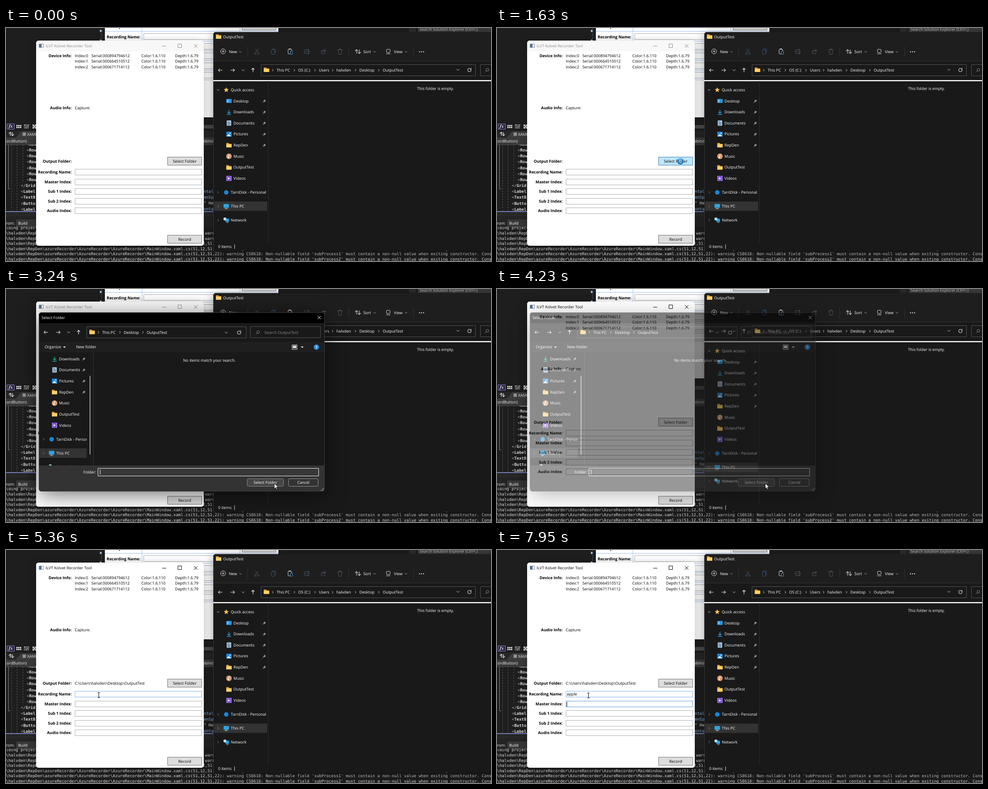
Recreate the animation shown at these times as an HTML page with a canvas. Size 1079 by 519 pixels, loop 8 s.

```html
<!DOCTYPE html>
<html lang="en">
<head>
<meta charset="utf-8">
<title>Recorder tool</title>
<style>
html, body { margin: 0; width: 100%; height: 100%; overflow: hidden; background: #1e1e1e; }
canvas { display: block; }
</style>
</head>
<body>
<canvas id="stage" width="1079" height="519"></canvas>
<script>
const W = 1079, H = 519, LOOP = 8000;
const UI = '"Open Sans", "Noto Sans", sans-serif';
const MONO = '"DejaVu Sans Mono", "Noto Sans Mono", monospace';
const stage = document.getElementById('stage').getContext('2d');
let g = stage;

// ---------- drawing helpers ----------
function text(s, x, y, color = '#fff', o = {}) {
  g.font = `${o.weight || 'normal'} ${o.size || 8.75}px ${o.font || UI}`;
  g.textRendering = 'geometricPrecision';
  g.textAlign = o.align || 'left';
  g.fillStyle = color;
  g.fillText(s, x, y + 3);
}
const mono = (s, x, y, color, weight) => text(s, x, y, color, { font: MONO, size: 8.97, weight });
const label = (s, x, y) => text(s, x, y, '#000', { weight: 'bold', size: 8.8, align: 'right' });

function box(x, y, w, h, fill, stroke, r = 0) {
  g.beginPath();
  if (stroke) g.roundRect(x + .5, y + .5, w - 1, h - 1, r);
  else g.roundRect(x, y, w, h, r);
  if (fill) { g.fillStyle = fill; g.fill(); }
  if (stroke) { g.strokeStyle = stroke; g.lineWidth = 1; g.stroke(); }
}
function trace(pts) {
  g.beginPath();
  for (let i = 0; i < pts.length; i += 2) g.lineTo(pts[i], pts[i + 1]);
}
function line(color, width, ...pts) {
  trace(pts);
  g.strokeStyle = color;
  g.lineWidth = width;
  g.stroke();
}
function poly(fill, ...pts) {
  trace(pts);
  g.closePath();
  g.fillStyle = fill;
  g.fill();
}
function disc(x, y, r, fill, stroke, width = 1) {
  g.beginPath();
  g.arc(x, y, r, 0, 7);
  if (fill) { g.fillStyle = fill; g.fill(); }
  if (stroke) { g.strokeStyle = stroke; g.lineWidth = width; g.stroke(); }
}
function shadowed(blur, alpha, draw) {
  g.save();
  g.shadowColor = `rgba(0,0,0,${alpha})`;
  g.shadowBlur = blur;
  g.shadowOffsetY = blur / 6;
  draw();
  g.restore();
}
function clipped(x, y, w, h, draw) {
  g.save();
  g.beginPath();
  g.rect(x, y, w, h);
  g.clip();
  draw();
  g.restore();
}
const right = (x, y, c = '#ddd', s = 2.5) => line(c, 1, x - s / 2, y - s, x + s / 2, y, x - s / 2, y + s);
const down = (x, y, c = '#ddd', s = 2.5) => line(c, 1, x - s, y - s / 2, x, y + s / 2, x + s, y - s / 2);
function arrow(x, y, dx, dy, c, s = 4.5) {
  const hx = x + dx * s, hy = y + dy * s, k = 3.4;
  line(c, 1.1, x - dx * s, y - dy * s, hx, hy);
  line(c, 1.1, hx - (dx + dy) * k, hy - (dy + dx) * k, hx, hy, hx - (dx - dy) * k, hy - (dy - dx) * k);
}
function cross(x, y, s, c) {
  line(c, 1, x - s, y - s, x + s, y + s);
  line(c, 1, x + s, y - s, x - s, y + s);
}

// ---------- icons, centred on x, y ----------
const icon = {
  folder(x, y) {
    poly('#e5a02f', x - 6, y - 5, x - 1, y - 5, x + 1, y - 3, x + 6, y - 3, x + 6, y + 5, x - 6, y + 5);
    box(x - 6, y - 2, 12, 7, '#ffd166', null, 1);
  },
  star(x, y) {
    const pts = [];
    for (let i = 0; i < 10; i++) {
      const a = i * Math.PI / 5 - Math.PI / 2, r = i % 2 ? 2.7 : 6;
      pts.push(x + r * Math.cos(a), y + r * Math.sin(a));
    }
    poly('#fbc14a', ...pts);
  },
  desktop(x, y) {
    box(x - 6, y - 4.5, 12, 9, '#2795dc', null, 1);
    box(x - 4, y - 2.5, 3, 1.5, '#c5ecff');
    box(x - 4, y + .5, 3, 1.5, '#c5ecff');
  },
  download(x, y, c = '#2e9fdc') {
    line(c, 1.4, x, y - 5, x, y + 3);
    line(c, 1.4, x - 3.5, y - .5, x, y + 3, x + 3.5, y - .5);
    line(c, 1.4, x - 5, y + 5.3, x + 5, y + 5.3);
  },
  document(x, y) {
    box(x - 5, y - 6, 10, 12, '#a9c3dd', null, 1);
    for (let i = 0; i < 4; i++) box(x - 3, y - 4 + i * 2.3, i ? 6 : 3, 1.1, '#45688f');
  },
  picture(x, y) {
    box(x - 6, y - 5.5, 12, 11, '#1f86d8', null, 1);
    poly('#fff', x - 5, y + 4.5, x - .5, y - .5, x + 5, y + 4.5);
    disc(x + 2.5, y - 2.3, 1.2, '#fff');
  },
  music(x, y) {
    disc(x, y, 6.2, '#d99a6c');
    line('#fff', 1, x - .5, y + 2.5, x - .5, y - 3.2, x + 2.5, y - 2);
    disc(x - 1.6, y + 2.4, 1.5, '#fff');
  },
  video(x, y) {
    box(x - 6, y - 6, 12, 12, '#7a4fd0', null, 1);
    for (const dx of [-5, 3.8]) for (let i = 0; i < 3; i++) box(x + dx, y - 4.2 + i * 3.4, 1.3, 1.6, '#d9c9ff');
    poly('#fff', x - 1.8, y - 2.6, x + 2.5, y, x - 1.8, y + 2.6);
  },
  cloud(x, y) { disc(x, y, 5, '#1686d9'); },
  pc(x, y) {
    box(x - 6, y - 5, 12, 8.5, '#2fa3dd', null, 1);
    box(x - 1, y + 3.5, 2, 2, '#8fb8d0');
    box(x - 3.5, y + 5, 7, 1, '#a9c8da');
  },
  network(x, y) {
    box(x - 2, y - 3, 8, 7, '#2fa3dd', null, 1);
    disc(x - 3, y - 2.5, 3.4, '#8fcbea');
    line('#fff', .8, x - 6, y - 2.5, x, y - 2.5);
    line('#fff', .8, x - 3, y - 5.5, x - 3, y + .5);
    box(x, y + 5, 5, 1, '#a9c8da');
  },
  pin(x, y) {
    poly('#9a9a9a', x, y - 3.5, x + 3.5, y, x + 1.5, y + .5, x, y + 3, x - 3, y, x - .5, y - 1.5);
    line('#9a9a9a', 1, x - 1, y + 1, x - 4, y + 4);
  },
  refresh(x, y) {
    g.beginPath();
    g.arc(x, y, 3.8, -.4, 5.2);
    g.strokeStyle = '#ddd';
    g.lineWidth = 1.1;
    g.stroke();
    line('#ddd', 1.1, x + 3.6, y - 4.6, x + 3.6, y - 1.8, x + .8, y - 1.8);
  },
  search(x, y) {
    disc(x + 1, y - 1, 3, null, '#888');
    line('#888', 1, x - 1.2, y + 1.2, x - 4.5, y + 4.5);
  }
};
const PLACES = [['Desktop', 'desktop'], ['Downloads', 'download'], ['Documents', 'document'],
  ['Pictures', 'picture'], ['RepDen', 'folder'], ['Music', 'music'],
  ['OutputTest', 'folder'], ['Videos', 'video']];
const ROOTS = [['TarnDisk - Personal', 'cloud'], ['This PC', 'pc'], ['Network', 'network']];
const STEP = 24.65, ROOT_STEP = 30.8;

function places(x, y, pinX, tint) {
  PLACES.forEach(([name, kind], i) => {
    const ry = y + i * STEP;
    icon[kind](x, ry, tint);
    text(name, x + 10, ry);
    if (i < 5) icon.pin(pinX, ry);
  });
}
function roots(x, y, w) {
  box(x - 27, y + ROOT_STEP - 10.5, w, 21, '#333');
  clipped(x - 27, 0, w, H, () => ROOTS.forEach(([name, kind], i) => {
    const ry = y + i * ROOT_STEP;
    right(x - 18, ry, '#888');
    icon[kind](x, ry);
    text(name, x + 10.3, ry);
  }));
}
function navBar(x, y, boxW, crumbs) {
  arrow(x, y, -1, 0, '#ddd');
  arrow(x + 27, y, 1, 0, '#ddd');
  down(x + 50.5, y, '#ddd', 3);
  arrow(x + 72.5, y, 0, -1, '#fff');
  box(x + 90, y - 13, boxW, 26, '#191919', '#555');
  icon.folder(x + 102.5, y - 1);
  for (const [name, cx] of crumbs) {
    right(cx - 8.5, y);
    text(name, cx, y);
  }
}

// ---------- desktop behind the windows ----------
function designer() {
  line('#3b4c6b', 1, 212.5, 0, 212.5, 28);
  for (const y of [6.5, 28]) poly('#b9cdec', 209, y - 3, 214, y, 209, y + 3);
  box(220, 0, 386, 199, '#fff');
  for (let i = 0; i < 6; i++) line('#9cc3f0', 1, 220, 7.5 + i * 21.6, 606, 7.5 + i * 21.6);
  for (const x of [302.5, 520.5]) line('#9cc3f0', 1, x, 0, x, x < 400 ? 199 : 8);
  label('Output Folder:', 299, -3);
  label('Recording Name:', 299, 20);
  box(525, -14, 76, 19, '#ddd', '#707070');
  for (let i = 0; i < 5; i++) box(306, Math.round(12 + i * 21.6), 295, 14, '#fff', '#abadb3');
}
function editor() {
  box(440, 216, 21, 8, '#4b4b4b');
  box(2, 213, 17, 13, '#26233a', '#8f86d8');
  text('fx', 10.5, 219, '#eee', { weight: 'italic bold', align: 'center', font: '"Noto Serif", serif' });
  for (let i = 0; i < 6; i++) box(23 + i % 3 * 4, 216 + (i > 2) * 4, 3, 3, '#ddd');
  for (let i = 0; i < 12; i++) box(40 + i % 4 * 3, 215 + (i >> 2) * 3.2, i % 3 ? 1.5 : 2.4, 2, '#ccc');
  for (let i = 0; i < 9; i++) box(59 + i % 3 * 3, 215 + Math.floor(i / 3) * 3, 3, 3, i % 2 ? '#777' : '#ddd');
  box(0, 229, W, 15, '#262626');
  poly('#3d3d3d', 22, 244, 34, 230, 90, 230, 90, 244);
  arrow(9.5, 236, 0, -1, '#eee', 4);
  arrow(14.5, 236, 0, 1, '#eee', 4);
  box(37, 233, 7, 7, null, '#ccc');
  box(39, 235, 3, 3, '#ccc');
  text('XAML', 47, 237, '#eee');
  box(0, 244, W, 17, '#3a3a3a');
  text('recordButton)', 46, 252, '#eee', { align: 'right' });
  text('TabInd', 462, 252, '#eee', { align: 'right' });

  clipped(0, 260, W, 148, () => {
    line('#888', 1, 5.5, 260, 5.5, 358.5, 9, 358.5);
    g.setLineDash([3, 3]);
    for (const x of [12.5, 24.5, 37.5]) line('#5a5a5a', 1, x, 260, x, x > 30 ? 345 : 408);
    g.setLineDash([]);
    const tags = [...Array(7).fill('<RowD'), '</Grid', '<Label', '<TextB', '<Butto', '<Label'];
    tags.forEach((tag, i) => {
      const x = i < 7 ? 46 : 33, y = 259 + i * 13.15, n = tag[1] === '/' ? 2 : 1;
      mono(tag.slice(0, n), x, y, '#b4b4b4');
      mono(tag.slice(n), x + n * 5.4, y, '#dadada', 'bold');
    });
    ['ntal', 'mnSp', '" He', 'onta'].forEach((s, i) => mono(s, 440, 364 + i * 13.15, i === 2 ? '#ddd' : '#86b6ea'));
  });
  box(0, 408, W, 2, '#7a82c0');
}
function output() {
  box(0, 410, W, 35, '#242424');
  g.setLineDash([1, 3]);
  line('#555', 1, 0, 414.5, W, 414.5);
  line('#555', 1, 2, 417.5, W, 417.5);
  g.setLineDash([]);
  text('rom:', 0, 435, '#eee');
  box(23, 427, 60, 16, '#363636', '#444');
  text('Build', 27, 435);
  clipped(0, 443, W, 76, () => {
    box(0, 443, W, 76, '#1e1e1e');
    const root = '\\halvden\\RepDen\\azureRecorder\\AzureRecorder\\AzureRecorder\\';
    const warn = n => root + `MainWindow.xaml.cs(51,12,51,22): warning CS8618: Non-nullable field 'subProcess${n}' must contain a non-null value when exiting constructor. Consider`;
    const short = root + 'Cameras.cs(11,9,11,30): warning';
    ['ilding project', short, short, warn(1), warn(2), warn(1), warn(2)].forEach((s, i) =>
      mono(s, i ? 0 : -5.4, 445.3 + i * 11.6, '#dcdcdc'));
  });
}

function explorer() {
  shadowed(24, .4, () => box(461, 9, 640, 487, '#191919', null, 6));
  box(461, 9, 640, 64, '#1e1e1e', null, [6, 0, 0, 0]);
  line('#333', 1, 461, 73.5, W, 73.5);
  line('#3a3a3a', 1, 461.5, 14, 461.5, 496);
  icon.folder(473, 19);
  text('OutputTest', 483, 20);

  disc(483, 52, 5.5, null, '#ddd');
  line('#ddd', 1, 480, 52, 486, 52);
  line('#ddd', 1, 483, 49, 483, 55);
  text('New', 496, 53);
  text('Sort', 795, 53);
  text('View', 863, 53);
  for (const x of [521.5, 820, 890]) down(x, 53, '#aaa');
  for (const x of [537.5, 762.5, 906.5]) line('#333', 1, x, 41, x, 64);
  const dim = '#555', blue = '#36577a';
  line(dim, 1, 554.5, 46.5, 561, 55);
  line(dim, 1, 561.5, 46.5, 555, 55);
  disc(554.5, 57, 1.8, null, blue);
  disc(561.5, 57, 1.8, null, blue);
  box(592, 46, 8, 10, null, blue, 1);
  box(590, 48, 8, 11, '#1e1e1e', blue, 1);
  box(627, 47, 9, 11, null, '#ddd', 1);
  box(629, 46, 5, 2, '#ddd');
  box(632, 51, 6, 8, '#1e1e1e', '#4ca3e0', 1);
  box(663, 48, 12, 9, null, dim, 1);
  line(blue, 1, 672.5, 46, 672.5, 59);
  line(blue, 1, 665, 52.5, 670, 52.5);
  box(701, 50, 9, 8, null, dim, 1);
  line(blue, 1, 704, 54, 705, 49.5, 711, 49.5);
  line(blue, 1, 708.5, 46.5, 711.5, 49.5, 708.5, 52.5);
  line(dim, 1, 737.5, 48.5, 748.5, 48.5);
  line(dim, 1, 739, 49, 740, 58.5, 746, 58.5, 747, 49);
  line(dim, 1, 741.5, 48, 741.5, 46.5, 744.5, 46.5, 744.5, 48);
  arrow(780, 52.5, 0, -1, '#ddd');
  arrow(786, 52.5, 0, 1, '#ddd');
  box(846, 47, 9, 8, null, '#ddd', 1);
  line('#ddd', 1, 846, 57.5, 855, 57.5);
  for (const x of [920, 924.5, 929]) disc(x, 53, 1.2, '#ddd');

  navBar(477, 94, 478, [['This PC', 602], ['OS (C:)', 650], ['Users', 696],
    ['halvden', 735], ['Desktop', 786], ['OutputTest', 838]]);
  down(1005.5, 93, '#ddd', 3);
  icon.refresh(1031, 93.5);
  box(1055, 81, 60, 26, '#191919', '#555');
  icon.search(1070, 94);
  box(461, 116, W, 2.5, '#fff');

  text('This folder is empty.', 955.5, 135, '#fff', { align: 'center' });
  down(472, 138);
  icon.star(490, 138);
  text('Quick access', 500, 138);
  places(496, 162.5, 575);
  roots(490, 366.2, 118);
  line('#2d2d2d', 1, 583.5, 118, 583.5, 478);
  text('0 items', 472, 487);
  box(508, 482, 1, 10, '#ddd');
}

function layer(draw) {
  const c = document.createElement('canvas');
  c.width = W;
  c.height = H;
  const prev = g;
  g = c.getContext('2d');
  draw();
  g = prev;
  return c;
}
const backdrop = layer(() => {
  box(0, 0, W, H, '#1e1e1e');
  designer();
  box(897, 0, 15, 9, '#2d2d2d');
  box(916, 0, W, 9, '#3c3c3c');
  text('Search Solution Explorer (Ctrl+;)', 920, 3, '#d0d0d0');
  editor();
  output();
  explorer();
  shadowed(20, .25, () => box(67, 28, 373, 457, '#fff', null, 6));
});

// ---------- recorder window ----------
const FIELDS = ['Recording Name:', 'Master Index:', 'Sub 1 Index:', 'Sub 2 Index:', 'Audio Index:'];
const DEVICES = ['000894794612', '000664510512', '000671714112'];
const fieldTop = i => Math.round(314 + i * 21.6);
const inside = (p, x, y, w, h) => p.x >= x && p.x < x + w && p.y >= y && p.y < y + h;

function button(s, y, fill = '#ddd', border = '#707070') {
  box(359, y, 77, 19, fill, border);
  text(s, 397.5, y + 9.5, '#000', { align: 'center', size: 8.8 });
}
function recorder(s) {
  const ink = s.active ? '#000' : '#8c8c8c';
  box(67, 28, 373, 457, '#fff', null, 6);
  box(67, 28, 373, 24, s.active ? '#fff' : '#f8f8f8', null, [6, 6, 0, 0]);
  box(73, 35, 11, 9, '#e8eef4', '#8a97a6');
  box(74, 36, 5, 7, '#4d6f95');
  text('ILVT Kolvet Recorder Tool', 88, 40, ink);
  line(ink, 1, 347.5, 40.5, 356.5, 40.5);
  box(382, 35, 9, 9, null, ink);
  cross(422, 40, 4, ink);

  label('Device Info:', 146, 62);
  DEVICES.forEach((id, i) => {
    const y = 62 + i * 12.4;
    text('Index:' + i, 153, y, '#000');
    text('Serial:' + id, 190, y, '#000');
    text('Color:1.6.110', 301, y, '#000');
    text('Depth:1.6.79', 376, y, '#000');
  });
  label('Audio Info:', 146, 178);
  text('Capture:', 153, 178, '#000');
  label('Output Folder:', 146, 296.5);
  if (s.folder) text('C:\\Users\\halvden\\Desktop\\OutputTest', 153, 296.5, '#000');
  if (s.pressed) button('Select Folder', 287, '#c4e5f6', '#2c628b');
  else if (s.hot) button('Select Folder', 287, '#bee6fd', '#3c7fb1');
  else button('Select Folder', 287);
  FIELDS.forEach((name, i) => {
    const y = fieldTop(i);
    label(name, 146, y + 7);
    box(153, y, 283, 14, '#fff', i === s.focus ? '#569de5' : i === s.hotField ? '#7eb4ea' : '#abadb3');
  });
  text(s.typed, 155.3, 321, '#000');
  if (s.caret) {
    const x = s.focus ? 155 : Math.round(155 + g.measureText(s.typed).width);
    box(x, fieldTop(s.focus) + 2, 1, 11, '#000');
  }
  button('Record', 461);
}

// ---------- folder dialog ----------
function dialogButton(s, x, w, fill, border) {
  box(x, 422, w, 18, fill, border, 3);
  text(s, x + w / 2, 430.5, '#fff', { align: 'center', size: 8.8 });
}
function paintDialog(commands, expanded, hot) {
  shadowed(46, .55, () => box(73, 52, 636, 399, '#333', null, 6));
  box(73, 52, 636, 26, '#000', null, [6, 6, 0, 0]);
  box(73, 76, 636, 42, '#191919');
  box(73, 118, 636, 23, '#1f1f1f');
  box(73, 141, 636, 252, '#191919');
  text('Select Folder', 79, 64);
  cross(697, 63.5, 3.7, '#fff');

  navBar(89, 96.5, 356, [['This PC', 214], ['Desktop', 262], ['OutputTest', 313]]);
  down(490, 97, '#ddd', 3);
  icon.refresh(518.5, 97);
  box(543, 83, 157, 26, '#191919', '#555');
  icon.search(560, 97);
  text('Search OutputTest', 575, 96.5, '#888');

  disc(690.5, 129.5, 6, '#2a8fd8');
  text('?', 690.5, 129.5, '#fff', { weight: 'bold', align: 'center' });
  if (commands) {
    text('Organize', 86, 129);
    text('New folder', 156, 129);
    for (const x of [130, 659]) poly('#ddd', x - 3.2, 128, x + 3.2, 128, x, 131.5);
    box(636, 124, 12, 11, '#191919', '#ddd');
    box(638, 126, 8, 6, '#ddd');
  }
  text('No items match your search.', 452.5, 159, '#fff', { align: 'center' });
  clipped(73, 141, 636, 252, () => {
    if (expanded) {
      places(108, 155.6 - STEP, 173.5, '#1fb89f');
      roots(101.5, 334.8, 105);
      box(186, 193, 2, 176, '#9a9a9a', null, 1);
    } else {
      right(83.5, 162, '#888');
      icon.star(101.5, 162);
      text('Quick access', 111.8, 162);
      roots(101.5, 192.8, 118);
    }
    line('#333', 1, 194.5, 141, 194.5, 393);
  });

  text('Folder:', 200.5, 408, '#fff', { align: 'right' });
  box(204, 399, 492, 18, '#383838', '#f4f4f4');
  box(209, 402, 1, 11, '#fff');
  if (hot) dialogButton('Select Folder', 536, 82, '#454545', '#8a8a8a');
  else dialogButton('Select Folder', 536, 82, '#333', '#fff');
  dialogButton('Cancel', 628, 67, '#333', '#9b9b9b');
  for (let i = 0; i < 3; i++) for (let j = 0; j <= i; j++) box(705 - j * 2.5, 443 + i * 2.5, 1.5, 1.5, '#aaa');
  box(73, 52, 636, 399, null, '#3c3c3c', 6);
}
const cache = {};
function dialog(...state) {
  const key = state.join();
  cache[key] = cache[key] || layer(() => paintDialog(...state));
  g.drawImage(cache[key], 0, 0);
}

// ---------- pointer ----------
// start, end, steps, target x, y, optional control point
const MOVES = [
  [300, 370, 2, 662, 321],
  [580, 1300, 11, 408, 298, 480, 240],
  [2370, 2620, 5, 617, 401],
  [2960, 3240, 5, 597, 433],
  [4510, 4690, 4, 411, 374],
  [4910, 5030, 3, 206, 326],
  [5220, 5360, 3, 206, 323],
  [5430, 5500, 2, 203, 324]
];
function pointerAt(t) {
  let x = 826, y = 411;
  for (const [a, b, n, tx, ty, cx = (x + tx) / 2, cy = (y + ty) / 2] of MOVES) {
    if (t < a) break;
    const k = Math.min(n, Math.floor((t - a) / (b - a) * (n - 1) + 1e-6) + 1) / n;
    const p = k * k * (3 - 2 * k), q = 1 - p;
    x = q * q * x + 2 * q * p * cx + p * p * tx;
    y = q * q * y + 2 * q * p * cy + p * p * ty;
  }
  return { x, y };
}
function arrowCursor({ x, y }) {
  const pts = [0, 0, 0, 11.6, 2.7, 9.2, 4.5, 13.2, 6.4, 12.3, 4.6, 8.5, 8.2, 8.3]
    .map((v, i) => v + (i % 2 ? y : x));
  poly('#fff', ...pts);
  g.strokeStyle = '#000';
  g.lineWidth = .8;
  g.stroke();
}
function beamCursor({ x, y }) {
  x = Math.round(x) + .5;
  line('#000', 1, x, y - 5, x, y + 5);
  for (const d of [-5.5, 5.5]) line('#000', 1, x - 2.5, y + d, x + 2.5, y + d);
}
function busyCursor({ x, y }, t) {
  disc(x, y - 1, 5.6, null, '#1273c4', 3);
  g.beginPath();
  g.arc(x, y - 1, 5.6, t / 160, t / 160 + 1.6);
  g.strokeStyle = '#58b4ee';
  g.stroke();
}

// ---------- timeline ----------
const KEYS = [6420, 6610, 6770, 6960, 7080];
function frame(t) {
  const within = (a, b) => t >= a && t < b;
  const p = pointerAt(t);
  const open = within(1690, 4290);
  const shown = t >= 300 && !within(6360, 7890);
  const hotField = open || !shown ? -1 : FIELDS.findIndex((_, i) => inside(p, 153, fieldTop(i), 283, 14));

  g.drawImage(backdrop, 0, 0);
  recorder({
    active: t >= 4180,
    folder: t >= 4235,
    pressed: within(1390, 1480),
    hot: !open && inside(p, 359, 287, 77, 19),
    hotField,
    focus: t >= 7890 ? 1 : t >= 5740 ? 0 : -1,
    typed: 'apple'.slice(0, KEYS.filter(k => t >= k).length),
    caret: within(5830, 6360) || within(6420, 7700) || t >= 7950
  });
  if (open) {
    g.globalAlpha = t < 4180 ? 1 : t < 4235 ? .5 : .15;
    dialog(t >= 1750, t >= 1840, inside(p, 536, 422, 82, 18));
    g.globalAlpha = 1;
  }
  if (!shown) return;
  if (within(1480, 1690)) busyCursor(p, t);
  else if (hotField >= 0) beamCursor(p);
  else arrowCursor(p);
}

const start = performance.now();
function tick() {
  frame((performance.now() - start) % LOOP);
  requestAnimationFrame(tick);
}
tick();
</script>
</body>
</html>
```
